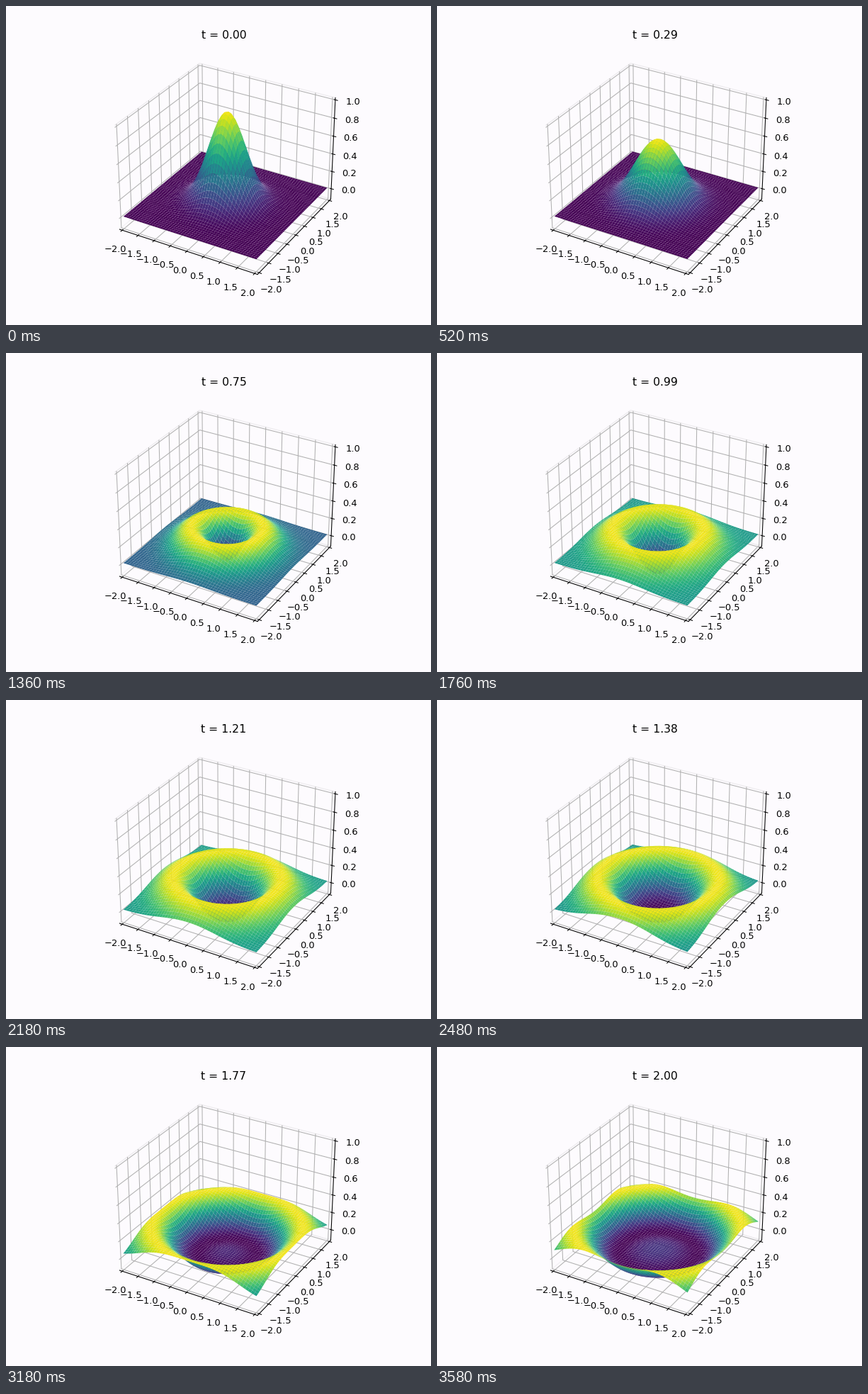
A matplotlib script that plays this animation: 600 px wide and 450 px high, repeating every 3610 ms.

```python
import numpy as np
import matplotlib.pyplot as plt
from matplotlib.animation import FuncAnimation
from mpl_toolkits.mplot3d.art3d import Poly3DCollection

LOOP_MS = 3610
FRAMES = 119
LAST_STEP = 192
DT = 2 / LAST_STEP
STEPS_PER_FRAME = 1.6325
BASE, DRIFT = 0.017, 0.007  # resting level and its slow rise
HEADROOM = 0.02             # part of the colour range left above the crest
BACKGROUND = "#fdfbfe"
PANE_EDGE = "#eeecef"

# Gaussian pulse exp(-2 r^2) as a cosine series on a wide periodic box,
# so that nothing reflects back into the visible part.
HALF_PERIOD = 6.0
SHARPNESS = 2.0
grid = np.linspace(-2, 2, 51)
waves = np.pi * np.arange(26) / HALF_PERIOD
coef = np.sqrt(np.pi / SHARPNESS) / HALF_PERIOD * np.exp(-waves**2 / (4 * SHARPNESS))
coef[0] /= 2
basis = np.cos(np.outer(grid, waves)) * coef
omega = np.hypot(waves[:, None], waves[None, :])
X, Y = np.meshgrid(grid, grid)


def height(t):
    """Solution of the 2D wave equation, released at rest."""
    return basis @ np.cos(omega * t) @ basis.T + BASE + DRIFT * t


def quads(z):
    pts = np.stack([X, Y, z], axis=-1)
    corners = [pts[:-1, :-1], pts[:-1, 1:], pts[1:, 1:], pts[1:, :-1]]
    return np.stack(corners, axis=2).reshape(-1, 4, 3)


def padded(low, high):
    pad = (high - low) / 48
    return low - pad, high + pad


fig = plt.figure(figsize=(6.4, 4.8), dpi=93.75, facecolor=BACKGROUND)
ax = fig.add_subplot(projection="3d", facecolor=BACKGROUND)
ax.set_xlim(*padded(-2, 2))
ax.set_ylim(*padded(-2, 2))
ax.set_zlim(*padded(-0.1, 1))
ax.set_xticks(np.linspace(-2, 2, 9))
ax.set_yticks(np.linspace(-2, 2, 9))
ax.set_zticks(np.linspace(0, 1, 6))
for axis in (ax.xaxis, ax.yaxis, ax.zaxis):
    axis.set_pane_color(BACKGROUND)
    axis.pane.set_edgecolor(PANE_EDGE)

surface = Poly3DCollection(quads(height(0)), cmap="viridis")
surface.set_array(np.zeros((len(grid) - 1) ** 2))
ax.add_collection3d(surface)
title = ax.set_title("t = 0.00")


def update(frame):
    t = min(round(frame * STEPS_PER_FRAME), LAST_STEP) * DT
    faces = quads(height(t))
    level = faces[:, :, 2].mean(axis=1)
    surface.set_verts(faces)
    surface.set_array(level)
    surface.set_clim(level.min(), level.max() + HEADROOM * np.ptp(level))
    title.set_text(f"t = {t:.2f}")
    return surface, title


anim = FuncAnimation(fig, update, frames=FRAMES, interval=LOOP_MS / FRAMES,
                     repeat=True, repeat_delay=0, blit=False)
plt.show()
```
